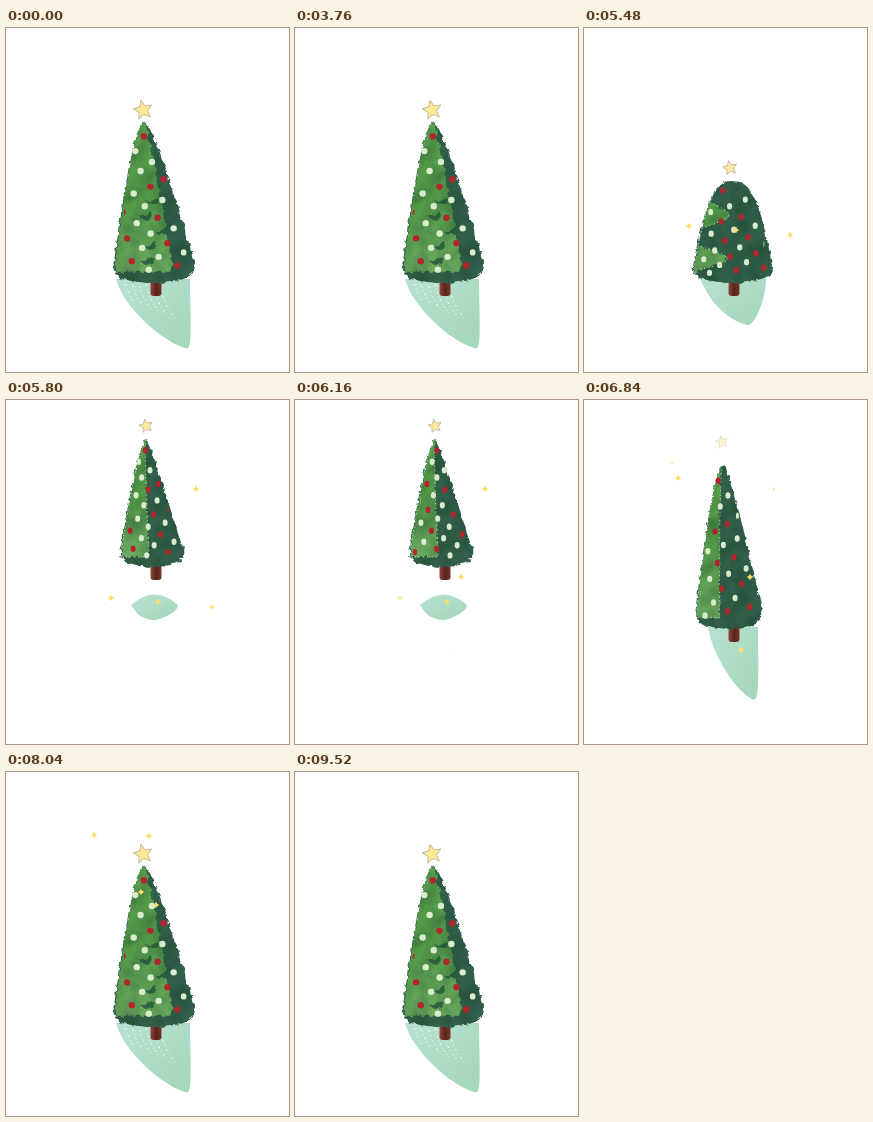
Recreate the animation shown at these times as an HTML page. Size 283x344 px, loop 10000 ms.

```html
<!DOCTYPE html>
<html lang="en">
<head>
<meta charset="utf-8">
<title>Jumping tree</title>
<style>
html, body { margin: 0; width: 100%; height: 100%; overflow: hidden; background: #fff; }
svg { display: block; width: 100vw; height: 100vh; }
</style>
</head>
<body>
<svg id="stage" viewBox="0 0 283 344">
  <defs>
    <filter id="paint" filterUnits="userSpaceOnUse" x="0" y="0" width="283" height="344" color-interpolation-filters="sRGB">
      <feTurbulence type="fractalNoise" baseFrequency=".2" numOctaves="2" seed="4" result="grain"/>
      <feDisplacementMap in="SourceGraphic" in2="grain" scale="5" xChannelSelector="R" yChannelSelector="G" result="rough"/>
      <feTurbulence type="fractalNoise" baseFrequency=".06" numOctaves="2" seed="9"/>
      <feColorMatrix values="0 0 0 0 .04  0 0 0 0 .18  0 0 0 0 .1  .6 0 0 0 -.22"/>
      <feComposite in2="rough" operator="in" result="wash"/>
      <feMerge><feMergeNode in="rough"/><feMergeNode in="wash"/></feMerge>
    </filter>
    <linearGradient id="leaf" x2="0" y2="1">
      <stop stop-color="#5ba14e"/><stop offset=".5" stop-color="#519747"/><stop offset="1" stop-color="#6aa95f"/>
    </linearGradient>
    <linearGradient id="bark">
      <stop stop-color="#8d4a3c"/><stop offset=".5" stop-color="#5b221b"/><stop offset="1" stop-color="#74372c"/>
    </linearGradient>
    <linearGradient id="mint" x2="1" y2="1">
      <stop stop-color="#b9e2d0"/><stop offset="1" stop-color="#a3d6ba"/>
    </linearGradient>
  </defs>
  <path id="shadow" fill="url(#mint)"/>
  <g id="rain" fill="none" stroke="#fff"/>
  <g id="tree">
    <rect id="trunk" x="144.5" width="11" height="15" rx="3" fill="url(#bark)"/>
    <g filter="url(#paint)">
      <path id="body" fill="#315f49"/>
      <path id="light" fill="url(#leaf)"/>
      <g id="dabs" fill="#2f6642"/>
    </g>
    <path id="stipple" fill="none" stroke="#fff" stroke-dasharray="1 4 1 2.5"/>
    <g id="beads"/>
    <polygon id="star" fill="#fce996" stroke="#a59c88" stroke-width=".7" vector-effect="non-scaling-stroke"/>
  </g>
  <g id="glints" fill="#ffdc67"/>
</svg>
<script>
const LOOP = 10000, START = 3760, LANDING = 7200, END = 7920;
const GROUND = 255, GOLDEN = 0.618, BEADS = 22;

// curveL and curveR bend the sides; split and wave place the lit side;
// the shadow hangs from (shadeL..shadeR, shadeY) down to its tip
const rest = {
  apex: 138, top: 93, left: 106, right: 192, base: 250, curveL: .62, curveR: .78, ripple: 2.5,
  split: .72, wave: 0, bead: 3.2, lift: 11, star: 10, glow: 1, detail: 1,
  shadeL: 110, shadeR: 184, shadeY: 251, dome: 0, tipX: 181, tipY: 320.5
};
const squat = {
  apex: 147, top: 153, left: 107, right: 190, base: 250, curveL: .4, curveR: .35, ripple: 0,
  split: .1, wave: .34, bead: 2.6, lift: 13, star: 7.5, glow: .9, detail: 0,
  shadeL: 116, shadeR: 182, shadeY: 250, dome: 0, tipX: 164, tipY: 297
};
const aloft = {
  apex: 141, top: 38, left: 113, right: 181, base: 162, curveL: .65, curveR: .95, ripple: 0,
  split: .45, wave: 0, bead: 2.5, lift: 12, star: 7, glow: .9, detail: 0,
  shadeL: 125, shadeR: 172, shadeY: 205, dome: 21, tipX: 148, tipY: 220
};
const slim = {
  apex: 139, top: 65, left: 110, right: 181, base: 224, curveL: .62, curveR: .8, ripple: 0,
  split: .36, wave: 0, bead: 2.5, lift: 23, star: 6.5, glow: .45, detail: 0,
  shadeL: 124, shadeR: 174, shadeY: 227, dome: 3, tipX: 170, tipY: 300
};
const keys = [
  [0, rest], [START, rest], [4900, squat], [5480, squat], [5800, aloft],
  [6160, aloft], [6840, slim], [LANDING, rest], [LOOP, rest]
];
const sparkles = [
  [206, 207], [105, 198], [152, 202], [190, 89], [166, 177], [157, 250],
  [94, 78], [88, 63], [143, 64], [150, 133], [135, 120], [163, 43]
];

const $ = id => document.getElementById(id);
const mix = (a, b, k) => a + (b - a) * k;
const clamp = v => Math.max(0, Math.min(1, v));
const ease = k => k * k * (3 - 2 * k);
const span = (t, a, b) => clamp((t - a) / (b - a));
const range = (n, fn) => Array.from({ length: n }, (_, i) => fn(i));

function set(el, attrs) {
  for (const name in attrs) el.setAttribute(name, attrs[name]);
}
function add(parent, tag, attrs) {
  const el = document.createElementNS('http://www.w3.org/2000/svg', tag);
  set(el, attrs);
  return parent.appendChild(el);
}
function spikes(count, inner, turn) {
  return range(count * 2, i => {
    const a = turn + i * Math.PI / count, r = i % 2 ? inner : 1;
    return [r * Math.sin(a), -r * Math.cos(a)].map(v => v.toFixed(2));
  }).join(' ');
}

// x of a side at height v, from 0 at the tip to 1 at the base
function side(p, v, isRight) {
  const far = isRight ? p.right : p.left;
  const bend = isRight ? p.curveR : p.curveL;
  const corner = 1 - .2 * clamp((v - .9) / .1) ** 2;
  const bump = p.ripple * (Math.abs(Math.sin(v * 26)) - .5) * v ** .3;
  return mix(p.apex, far, v ** bend * corner) + (isRight ? bump : -bump / 3);
}
const height = (p, v) => mix(p.top, p.base, v);
const across = (p, v, u) => mix(side(p, v, false), side(p, v, true), u);

function outline(p) {
  const heights = range(33, i => (i / 32) ** 1.5);
  const down = heights.map(v => [side(p, v, true), height(p, v)]);
  const up = heights.map(v => [side(p, v, false), height(p, v)]).reverse();
  return `M${down.join('L')}Q150 ${p.base + 10} ${up.join('L')}Z`;
}
function litSide(p) {
  const heights = range(33, i => .01 + .95 * (i / 32) ** 1.5);
  const left = heights.map(v => [across(p, v, .015), height(p, v)]);
  const right = heights.map(v => {
    const reach = p.split + p.wave * Math.cos((v - .35) / .45 * 2 * Math.PI);
    return [across(p, v, Math.max(.015, reach)), height(p, v)];
  }).reverse();
  return `M${left.join('L')}L${right.join('L')}Z`;
}
function shade(p) {
  const { shadeL: l, shadeR: r, shadeY: y, tipX, tipY } = p, w = r - l, h = tipY - y;
  return `M${l} ${y}Q${(l + r) / 2} ${y - p.dome} ${r} ${y}` +
    `C${r} ${y + h / 2} ${tipX + 6} ${tipY} ${tipX} ${tipY}` +
    `C${tipX - w * .35} ${tipY - h * .1} ${l + w * .1} ${y + h * .4} ${l} ${y}Z`;
}

for (let i = 0; i < 6; i++) {
  const x = 119 + i * 7, drop = 20 + i * 4;
  add($('rain'), 'path', {
    d: `M${x} 253q2 ${drop * .6} ${drop * .45} ${drop}`, 'stroke-dasharray': `1 ${2 + i % 3} 2 3`
  });
}
for (let i = 0; i < 5; i++) {
  add($('dabs'), 'path', { d: `M${139 - 9 * Math.sin(i * 2.2)} ${172 + i * 15}q7 4 13 -4q3 8 -4 9q-6 0 -9 -5Z` });
}
const beads = range(BEADS, i => add($('beads'), 'ellipse', {
  fill: i % 5 === 0 || i % 5 === 4 ? '#b3252d' : '#d9eccd'
}));
const glints = sparkles.map(() => add($('glints'), 'polygon', { points: spikes(4, .52, 0) }));
set($('star'), { points: spikes(5, .46, -.2) });

function poseAt(t) {
  const next = keys.findIndex(key => key[0] > t);
  const [t0, from] = keys[next - 1], [t1, to] = keys[next];
  const k = ease(span(t, t0, t1)), pose = {};
  for (const name in from) pose[name] = mix(from[name], to[name], k);
  return pose;
}

function render(t) {
  const p = poseAt(t);
  const hop = -4 * Math.sin(Math.PI * span(t, 5800, 6160));
  const settle = span(t, LANDING, END);
  const stretch = 1 - .08 * (1 - settle) * Math.sin(settle * 3 * Math.PI);
  const spin = 2 * ease(span(t, START, END));

  set($('tree'), { transform: `translate(0 ${hop + GROUND * (1 - stretch)}) scale(1 ${stretch})` });
  set($('body'), { d: outline(p) });
  const lit = litSide(p);
  set($('light'), { d: lit });
  set($('stipple'), { d: lit, opacity: .75 * (1 - p.detail) });
  set($('dabs'), { opacity: p.detail });
  set($('shadow'), { d: shade(p) });
  set($('rain'), { opacity: p.detail });
  set($('trunk'), { y: p.base + 3 });
  set($('star'), { transform: `translate(${p.apex - 1} ${p.top - p.lift}) scale(${p.star})`, opacity: p.glow });

  beads.forEach((bead, i) => {
    const v = .96 * ((i + .5) / BEADS) ** .6;
    const u = (i * GOLDEN + .45 + spin) % 1;
    const turn = clamp(Math.min(u, 1 - u) * 20);
    set(bead, { cx: across(p, v, .05 + .9 * u), cy: height(p, v), rx: p.bead * turn, ry: 3.2 });
  });

  sparkles.forEach(([x, y], i) => {
    const start = 4500 + i * 325, u = span(t, start, start + 1450);
    const size = 3.3 * clamp(8 * Math.min(u, 1 - u));
    set(glints[i], { transform: `translate(${x} ${y}) scale(${size})` });
  });
}

const begin = performance.now();
function tick() {
  render((performance.now() - begin) % LOOP);
  requestAnimationFrame(tick);
}
tick();
</script>
</body>
</html>
```
